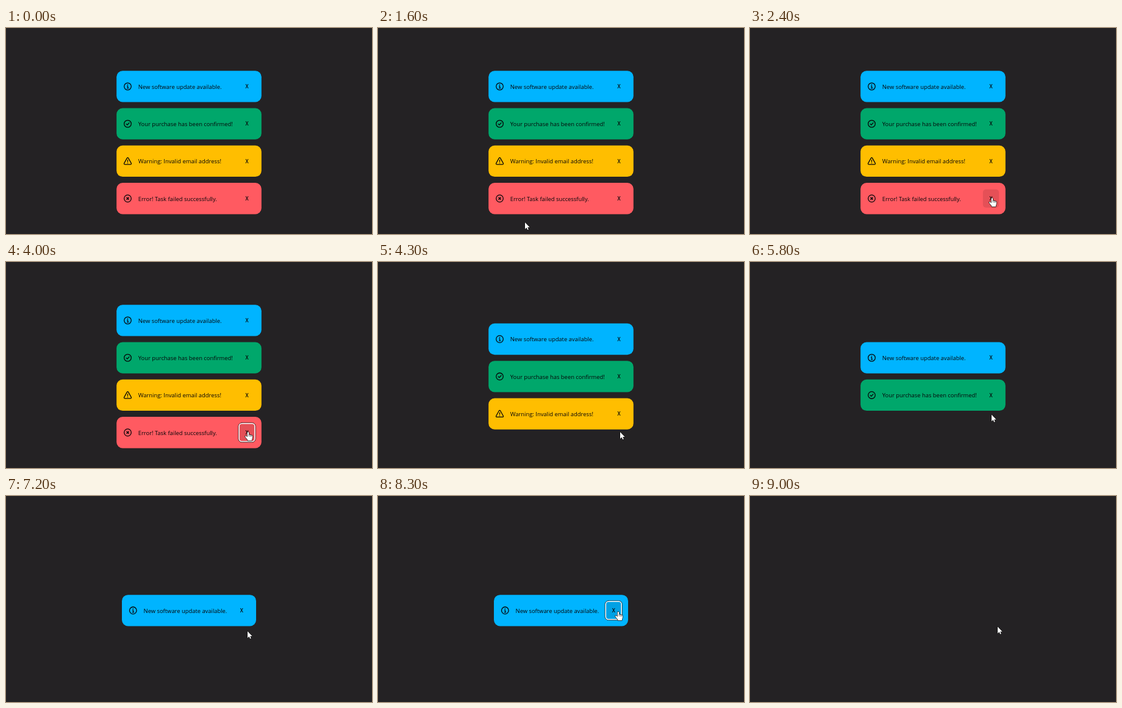
Animation, 600 px wide and 338 px high, one loop 9.1 s. Source, as an HTML page with a canvas:

```html
<!DOCTYPE html>
<html lang="en">
<head>
<meta charset="utf-8">
<title>Notifications</title>
<style>
  html, body { margin: 0; width: 100%; height: 100%; overflow: hidden; background: #242224; }
  canvas { display: block; width: 600px; height: 338px; }
</style>
</head>
<body>
<canvas id="stage"></canvas>
<script>
const W = 600, H = 338, LOOP = 9100, TICK = 100;
const CARD_H = 51.3, GAP = 10, MID_Y = 187.8;
const INK = '#060608';
const FONT = '"Open Sans", "Noto Sans", sans-serif';

const canvas = document.getElementById('stage');
const ctx = canvas.getContext('2d');
const dpr = window.devicePixelRatio || 1;
canvas.width = W * dpr;
canvas.height = H * dpr;

// Each card is pressed at `press` and disappears 200 ms later.
const HOLD = 200;
const cards = [
  { text: 'New software update available.', color: '#00b4ff', icon: 'info', width: 220, press: 8300 },
  { text: 'Your purchase has been confirmed!', color: '#00a76b', icon: 'check', width: 237.6, press: 7000 },
  { text: 'Warning: Invalid email address!', color: '#ffbe00', icon: 'warning', width: 220, press: 5600 },
  { text: 'Error! Task failed successfully.', color: '#ff5a61', icon: 'error', width: 212, press: 4000 }
];

// Pointer moves: start, end, then the Bezier points that follow the current place.
const POINTER_IN = 1600;
const START = [241, 319];
const moves = [
  [1600, 2400, [310, 332], [425, 320], [397, 279]],
  [4700, 5200, [414, 267], [396, 250.5]],
  [6100, 6500, [424, 238], [396, 222]],
  [7400, 7900, [406, 210], [397, 199]],
  [7900, 8000, [388, 184]],
  [8000, 8100, [394, 190]],
  [8700, 9000, [398, 202], [406, 214.5]]
];

const smooth = u => u * u * (3 - 2 * u);

function bezier(points, u) {
  while (points.length > 1) {
    points = points.slice(1).map((p, i) => p.map((v, k) => points[i][k] + (v - points[i][k]) * u));
  }
  return points[0];
}

function pointerAt(t) {
  let place = START;
  for (const [from, to, ...path] of moves) {
    if (t <= from) break;
    place = bezier([place, ...path], smooth(Math.min(1, (t - from) / (to - from))));
  }
  return place;
}

function roundRect(x, y, w, h, r) {
  ctx.beginPath();
  ctx.roundRect(x, y, w, h, r);
}

function at(x, y, scale, draw) {
  ctx.save();
  ctx.translate(x, y);
  ctx.scale(scale, scale);
  draw();
  ctx.restore();
}

function stroke(d, width) {
  ctx.lineWidth = width;
  ctx.stroke(new Path2D(d));
}

const RING = 'M-9.5 0a9.5 9.5 0 1 0 19 0a9.5 9.5 0 1 0 -19 0';
const icons = {
  info() {
    stroke(RING, 2.1);
    stroke('M-1.6 -.8H.4V4.4M-1.8 4.6H2.4', 1.8);
    stroke('M0 -4.4V-4.3', 2.6);
  },
  check() {
    stroke(RING, 2.1);
    stroke('M-3.8 .3L-1.1 3L4 -2.6', 2.1);
  },
  warning() {
    stroke('M-1.7 -8.4L-9.5 5.6Q-10.6 8.6 -7.8 8.8H7.8Q10.6 8.6 9.5 5.6L1.7 -8.4Q0 -10.6 -1.7 -8.4Z', 2.1);
    stroke('M0 -3.2V1.6', 1.9);
    stroke('M0 5V5.1', 2.2);
  },
  error() {
    stroke(RING, 2.1);
    stroke('M-2.4 -2.4L2.4 2.4M2.4 -2.4L-2.4 2.4', 2.7);
  }
};

function drawCard(card, x, y, w, t, pointer) {
  const mid = y + CARD_H / 2;
  const btn = { x: x + w - 37, y: mid - 15, w: 26.4, h: 30 };
  const hover = pointer &&
    pointer[0] >= btn.x && pointer[0] <= btn.x + btn.w &&
    pointer[1] >= btn.y && pointer[1] <= btn.y + btn.h;

  ctx.fillStyle = card.color;
  roundRect(x, y, w, CARD_H, 10);
  ctx.fill();

  if (hover) {
    ctx.fillStyle = 'rgba(0,0,0,.1)';
    roundRect(btn.x, btn.y, btn.w, btn.h, 5);
    ctx.fill();
  }
  if (t >= card.press) {
    ctx.lineWidth = 1;
    ctx.strokeStyle = '#1b1416';
    roundRect(btn.x - .8, btn.y - .8, btn.w + 1.6, btn.h + 1.6, 5.5);
    ctx.stroke();
    ctx.lineWidth = 1.5;
    ctx.strokeStyle = '#fff';
    roundRect(btn.x + .3, btn.y + .3, btn.w - .6, btn.h - .6, 4.5);
    ctx.stroke();
  }

  ctx.strokeStyle = INK;
  ctx.lineCap = ctx.lineJoin = 'round';
  at(x + 18.3, mid, .61, icons[card.icon]);

  ctx.fillStyle = INK;
  ctx.textAlign = 'left';
  ctx.font = '9.4px ' + FONT;
  ctx.fillText(card.text, x + 35.6, mid + 3.8);
  ctx.textAlign = 'center';
  ctx.font = '600 8.2px ' + FONT;
  ctx.fillText('X', btn.x + btn.w / 2, mid + 3.2);
  return hover;
}

const ARROW = new Path2D('M0 0V17L4 13.3L6.5 19L9 18L6.6 12.4H12Z');
const HAND = new Path2D('M-2 1.5Q-2 0 -.3 0Q1.6 0 1.6 1.6V7Q4.4 5.8 5 7.7Q7.4 6.8 8 8.7Q10.8 8 10.8 10.4V14.6' +
  'Q10.8 17 9.2 19V22H-1.2V20L-6.6 13.6Q-8.8 10.8 -7 10Q-5.2 9.4 -2 13Z');
const KNUCKLES = 'M1.6 7V11M5 8V11.4M8 9V12';

function drawPointer([x, y], hand) {
  at(x, y, .64, () => {
    const shape = hand ? HAND : ARROW;
    ctx.lineJoin = 'round';
    ctx.strokeStyle = '#111';
    ctx.lineWidth = 2;
    ctx.stroke(shape);
    ctx.fillStyle = '#fff';
    ctx.fill(shape);
    if (hand) stroke(KNUCKLES, .9);
  });
}

function draw(t) {
  ctx.setTransform(dpr, 0, 0, dpr, 0, 0);
  ctx.fillStyle = '#242224';
  ctx.fillRect(0, 0, W, H);

  const pointer = t >= POINTER_IN ? pointerAt(t) : null;
  const shown = cards.filter(c => t < c.press + HOLD);
  const w = Math.max(...shown.map(c => c.width));
  const top = MID_Y - (shown.length * (CARD_H + GAP) - GAP) / 2;
  let hand = false;
  shown.forEach((card, i) => {
    if (drawCard(card, (W - w) / 2, top + i * (CARD_H + GAP), w, t, pointer)) hand = true;
  });
  if (pointer) drawPointer(pointer, hand);
}

const begin = performance.now();
function frame() {
  const t = (performance.now() - begin) % LOOP;
  draw(Math.floor(t / TICK) * TICK);
  requestAnimationFrame(frame);
}
frame();
</script>
</body>
</html>
```
